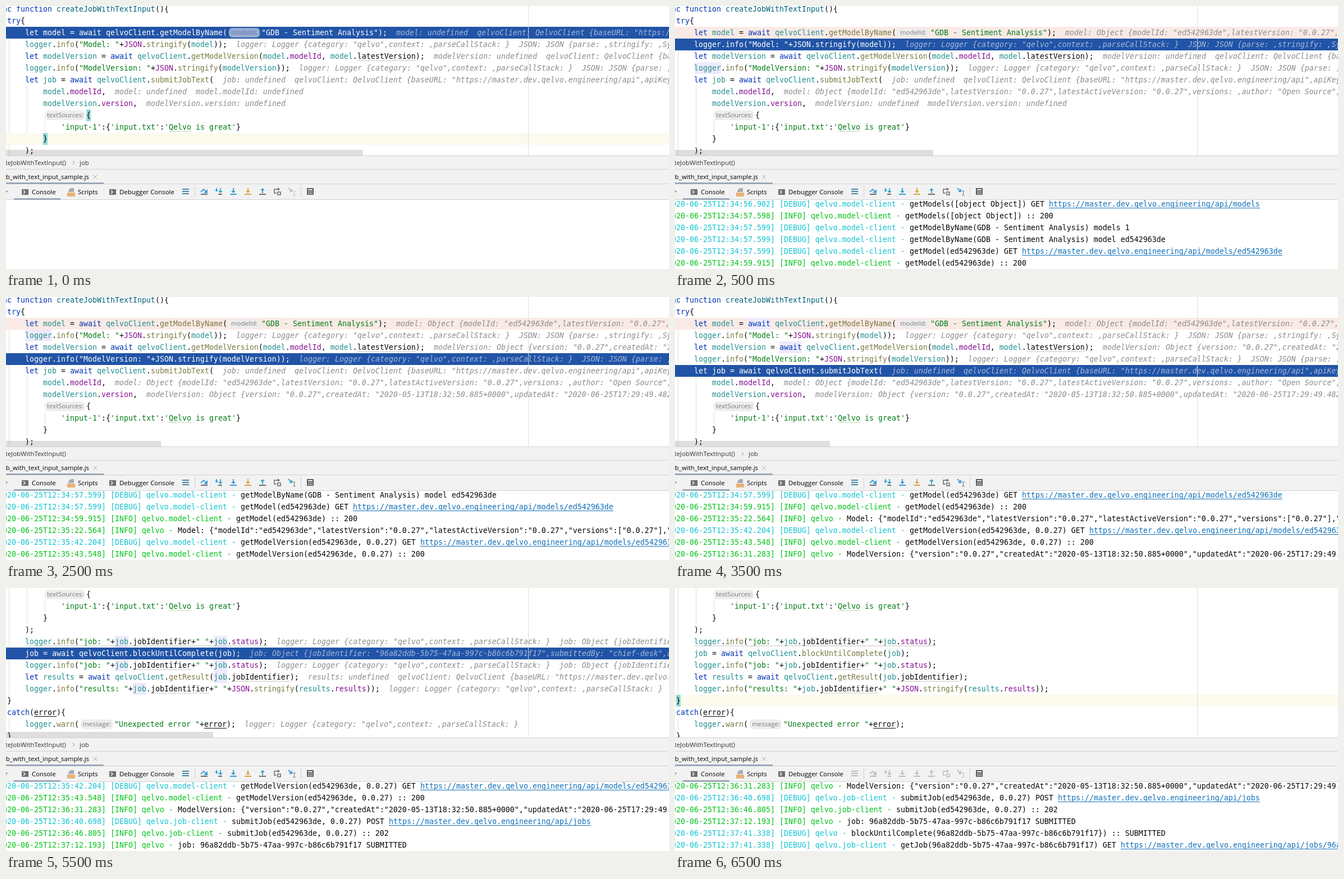
An HTML page that plays this animation: 1181x468 px, repeating every 8 s.

```html
<!DOCTYPE html>
<html lang="en">
<head>
<meta charset="utf-8">
<title>Debugger session</title>
<style>
html, body { margin: 0; width: 100%; height: 100%; overflow: hidden; background: #fff; }
svg { display: block; }
text { white-space: pre; }
.mono { font: 13.29px "DejaVu Sans Mono", "Noto Sans Mono", monospace; }
.hint { font-style: italic; }
.ui { font: 11.4px "Open Sans", "Noto Sans", sans-serif; }
</style>
</head>
<body>
<svg id="stage" width="1181" height="468" viewBox="0 0 1181 468"></svg>
<script>
const stage = document.getElementById('stage');
const CHAR = 8, ROW = 21;
const API = 'https://master.dev.qelvo.engineering/api';
const JOB = '96a82ddb-5b75-47aa-997c-b86c6b791f17';
const PILLS = { modelId: 61, textSources: 77, message: 63 };

// Column and text of each code line; parameter hints stand between § signs.
const CODE = [
  [-4, 'async function createJobWithTextInput(){'],
  [0, 'try{'],
  [4, 'let model = await qelvoClient.getModelByName(§modelId§"GDB - Sentiment Analysis");'],
  [4, 'logger.info("Model: "+JSON.stringify(model));'],
  [4, 'let modelVersion = await qelvoClient.getModelVersion(model.modelId, model.latestVersion);'],
  [4, 'logger.info("ModelVersion: "+JSON.stringify(modelVersion));'],
  [4, 'let job = await qelvoClient.submitJobText('],
  [8, 'model.modelId,'],
  [8, 'modelVersion.version,'],
  [8, '§textSources§{'],
  [12, "'input-1':{'input.txt':'Qelvo is great'}"],
  [8, '}'],
  [4, ');'],
  [4, 'logger.info("job: "+job.jobIdentifier+" "+job.status);'],
  [4, 'job = await qelvoClient.blockUntilComplete(job);'],
  [4, 'logger.info("job: "+job.jobIdentifier+" "+job.status);'],
  [4, 'let results = await qelvoClient.getResult(job.jobIdentifier);'],
  [4, 'logger.info("results: "+job.jobIdentifier+" "+JSON.stringify(results.results));'],
  [0, '}'],
  [0, 'catch(error){'],
  [4, 'logger.warn(§message§"Unexpected error "+error);'],
  [0, '}']
];

const BY_ID = 'model-client - getModelVersion(ed542963de, 0.0.27)';
const LOG = [
  `12:34:56.902|DEBUG|.model-client - getModels([object Object]) GET ${API}/models`,
  '12:34:57.598|INFO|.model-client - getModels([object Object]) :: 200',
  '12:34:57.599|DEBUG|.model-client - getModelByName(GDB - Sentiment Analysis) models 1',
  '12:34:57.599|DEBUG|.model-client - getModelByName(GDB - Sentiment Analysis) model ed542963de',
  `12:34:57.599|DEBUG|.model-client - getModel(ed542963de) GET ${API}/models/ed542963de`,
  '12:34:59.915|INFO|.model-client - getModel(ed542963de) :: 200',
  '12:35:22.564|INFO| - Model: {"modelId":"ed542963de","latestVersion":"0.0.27","latestActiveVersion":"0.0.27","versions":["0.0.27"],"author":',
  `12:35:42.204|DEBUG|.${BY_ID} GET ${API}/models/ed542963de/versions/0.0.27`,
  `12:35:43.548|INFO|.${BY_ID} :: 200`,
  '12:36:31.283|INFO| - ModelVersion: {"version":"0.0.27","createdAt":"2020-05-13T18:32:50.885+0000","updatedAt":"2020-06-25T17:29:49.482+0000"',
  `12:36:40.698|DEBUG|.job-client - submitJob(ed542963de, 0.0.27) POST ${API}/jobs`,
  '12:36:46.805|INFO|.job-client - submitJob(ed542963de, 0.0.27) :: 202',
  `12:37:12.193|INFO| - job: ${JOB} SUBMITTED`,
  `12:37:41.338|DEBUG| - blockUntilComplete(${JOB}}) :: SUBMITTED`,
  `12:37:41.338|DEBUG|.job-client - getJob(${JOB}) GET ${API}/jobs/${JOB}`
];

// exec: running line, mark: highlighted word, bar: scrollbar width, log: last console line
const SCENES = [
  { exec: 2, bar: 636, crumb: 'job', log: -1, caret: 11, braces: [[9, 143], [11, 66]] },
  { exec: 3, bar: 460, mark: 'logger', log: 5 },
  { exec: 4, bar: 460, mark: 'await', crumb: 'modelVersion', log: 6 },
  { exec: 5, bar: 276, mark: 'logger', log: 8 },
  { exec: 6, bar: 276, mark: 'await', crumb: 'job', log: 9 },
  { exec: 13, bar: 369, mark: 'logger', log: 11, scroll: 183 },
  { exec: 14, bar: 369, mark: 'job', crumb: 'job', log: 12, scroll: 183 },
  { bar: 0, log: 14, scroll: 183, caret: 18, braces: [[18, 2]] }
];

const rect = (x, y, w, h, fill, r = 0) =>
  `<rect x="${x}" y="${y}" width="${w}" height="${h}" rx="${r}" fill="${fill}"/>`;
const text = (x, y, body, fill, cls = 'mono', anchor = 'start') =>
  `<text x="${x}" y="${y}" fill="${fill}" class="${cls}" text-anchor="${anchor}">${body}</text>`;
const stroke = (d, color, width = 1) =>
  `<path d="${d}" fill="none" stroke="${color}" stroke-width="${width}"/>`;
const wave = (x, y, w, color) =>
  stroke(`M${x} ${y}` + 'l2 -2l2 2'.repeat(w / 4), color, 0.8);

function colorOf(word, before, after) {
  if (/^["']/.test(word)) return '#067d17';
  if (!/\w/.test(word)) return '#080808';
  if (/^(async|function|try|catch|let|await)$/.test(word)) return '#0033b3';
  if (/^(error|latestVersion|jobIdentifier)$/.test(word)) return '#080808';
  if (word === 'createJobWithTextInput') return '#00627a';
  if (before === '.') return after === '(' ? '#7a7a43' : '#871094';
  return word === 'JSON' ? '#871094' : '#248f8f';
}

function hints(n) {
  const model = n > 0
    ? 'model: Object {modelId: "ed542963de",latestVersion: "0.0.27",latestActiveVersion: "0.0.27",versions: ,author: "Open Source",'
    : 'model: undefined';
  const version = n > 2
    ? 'modelVersion: Object {version: "0.0.27",createdAt: "2020-05-13T18:32:50.885+0000",updatedAt: "2020-06-25T17:29:49.482+0000"'
    : 'modelVersion: undefined';
  const client = `  qelvoClient: QelvoClient {baseURL: "${API}",apiKey: "`;
  const logger = 'logger: Logger {category: "qelvo",context: ,parseCallStack: }';
  const json = logger + '  JSON: JSON {parse: ,stringify: ,Symbol(';
  const job = `job: Object {jobIdentifier: "${JOB}",submittedBy: "chief-desk",accountIdentifier`;
  const logJob = `${logger}  ${job}`;
  return {
    2: model + (n ? '' : client), 3: json, 4: version + (n > 2 ? '' : client), 5: json,
    6: 'job: undefined' + client,
    7: model + (n ? '' : '  model.modelId: undefined'),
    8: n ? version + (n > 2 ? '' : '  modelVersion.version: undefined') : 'modelVersion.version: undefined',
    13: logJob, 14: job, 15: logJob, 16: 'results: undefined' + client, 17: logger, 20: logger
  };
}

function codeLine(i, top, scene, hint) {
  const [col, source] = CODE[i];
  const exec = i === scene.exec, waveColor = exec ? '#a9bbdf' : '#b4b4b4';
  let x = 2 + col * CHAR, under = '', over = '';
  source.split('§').forEach((part, k) => {
    if (k % 2) {
      const w = PILLS[part];
      under += rect(x + 3, top + 2, w - 6, 17, exec ? '#96abd3' : '#ededed', 6);
      over += text(x + 7, top + 14, part + ':', exec ? '#65789f' : '#7a7a7a', 'ui');
      x += w;
      return;
    }
    let spans = '';
    for (const m of part.matchAll(/"[^"]*"|'[^']*'|\w+|[^\w"']/g)) {
      const word = m[0], at = x + m.index * CHAR, w = word.length * CHAR;
      const fill = exec ? '#fff' : colorOf(word, part[m.index - 1], part[m.index + word.length]);
      spans += `<tspan fill="${fill}">${word}</tspan>`;
      if (word === scene.mark && !exec) under += rect(at, top, w, ROW, '#edebfc');
      if (/^(latestVersion|jobIdentifier)$/.test(word)) over += wave(at, top + 19, w, waveColor);
      if (word.includes('Qelvo')) over += wave(at + CHAR, top + 19, 40, '#a9c4a4');
      if (word === 'error') over += rect(at, top + 17, w, 1, '#080808');
    }
    over += text(x, top + 15, spans, '#080808');
    x += part.length * CHAR;
  });
  if (i === 13) over += wave(34, top + 19, source.length * CHAR, waveColor);
  if (hint) over += text(x + 16, top + 15, hint, exec ? '#a5b8de' : '#8c8c8c', 'mono hint');
  return under + over;
}

function editor(n) {
  const scene = SCENES[n], topOf = i => i * ROW - 5 - (scene.scroll || 0);
  const band = (i, fill) => i === undefined ? '' : rect(0, topOf(i), 1181, ROW, fill);
  const guide = (x, from, to) => rect(x, topOf(from), 1, (to - from + 1) * ROW, '#e0e0e0');
  let out = rect(0, 0, 1181, 266, '#fff');
  out += guide(5, 2, 17) + guide(5, 20, 20) + guide(37, 7, 11) + guide(69, 10, 10);
  if (n) out += band(2, '#faeae6');
  out += band(scene.caret, '#fcfaed') + band(scene.exec, '#2154a6');
  out += rect(930, 0, 1, 266, '#dcdcdc');
  for (const [i, x] of scene.braces || []) out += rect(x, topOf(i), CHAR, ROW, '#93d9d9');
  const notes = n < 7 ? hints(n) : {};
  CODE.forEach((_, i) => {
    const top = topOf(i);
    if (top > -ROW + 2 && top < 266) out += codeLine(i, top, scene, notes[i]);
  });
  return out + rect(0, 256, scene.bar, 10, 'rgba(0,0,0,.13)');
}

function toolbar(n) {
  const off = n === 7, tint = c => off ? '#bdbdbd' : c;
  const blue = tint('#389fd6'), gray = tint('#6e6e6e'), gold = tint('#d9a343');
  const at = (x, body) => `<g transform="translate(${x} 330)">${body}</g>`;
  const down = (x, c) => stroke(`M${x} -6V0`, c, 2) +
    `<path d="M${x - 4} -1h8l-4 4z" fill="${c}"/>`;
  const into = c => down(0, c) + rect(-6, 4, 12, 2, c);
  const terminal = x => at(x, rect(-6, -4, 12, 10, '#6e6e6e') + stroke('M-3 -2l3 3l-3 3', '#f2f2f2', 1.5));
  const cursor = n === 0 || off ? '#bdbdbd' : '#389fd6';
  const beam = n === 0 || off ? '#bdbdbd' : '#6e6e6e';
  return terminal(34) + terminal(190) +
    at(116, '<path d="M0 -6h5v7h-10v-2z" fill="#a5adb4"/><path d="M-5 -2l4 -4v4z" fill="#a5adb4"/>' +
      rect(-7, 2, 14, 7, '#e8b277')) +
    at(320, [-5, -1, 3].map(y => rect(-6, y, 12, 2, tint('#4a86a8'))).join('')) +
    rect(336, 320, 1, 20, '#d1d1d1') + rect(525, 320, 1, 20, '#d1d1d1') +
    at(353, stroke('M-6 1L-1 -4L3 0', blue, 1.8) + `<path d="M6 -4v7h-7z" fill="${blue}"/>` + rect(-6, 4, 12, 2, gray)) +
    at(379, stroke('M-4 -6v4M3 -6V0', blue, 1.8) +
      `<path d="M-7 -3h6l-3 4zM-1 -1h8l-4 4z" fill="${blue}"/>` + rect(-1, 4, 7, 2, gray)) +
    at(405, into(blue)) + at(431, into(gold)) +
    at(457, stroke('M0 3V-2', blue, 2) + `<path d="M-4 -2h8l-4 -4z" fill="${blue}"/>` + rect(-6, 4, 12, 2, gray)) +
    at(483, stroke('M-1 3h-4v-7h7', gray, 1.6) + `<path d="M1 -7l4 3l-4 3z" fill="${gray}"/>` +
      stroke('M1 1h5v5h-5z', gray, 1.6)) +
    at(509, stroke('M-6 -6l5 5', cursor, 1.8) + `<path d="M1 -5v6h-6z" fill="${cursor}"/>` +
      stroke('M2 -1h1.5l1 1l1 -1h1.5M4.5 0v6M2 7h1.5l1 -1l1 1h1.5', beam)) +
    at(542, rect(-6, -6, 12, 12, '#5a5a5a') + rect(-4, -4, 8, 2, '#f2f2f2') +
      [-4, -1, 2].map(x => rect(x, 0, 2, 1.5, '#f2f2f2') + rect(x, 3, 2, 1.5, '#f2f2f2')).join(''));
}

function panels(n) {
  const { crumb } = SCENES[n];
  let out = rect(0, 266, 1181, 80, '#f2f2f2');
  for (const y of [266, 290, 316, 344]) out += rect(0, y, 1181, 1, '#d1d1d1');
  out += text(107, 283, 'createJobWithTextInput()', '#333', 'ui', 'end');
  if (crumb) out += stroke('M119 276l3 3l-3 3', '#8c8c8c') + text(131, 283, crumb, '#333', 'ui');
  out += text(148, 308, 'create_job_with_text_input_sample.js', '#000', 'ui', 'end') +
    stroke('M155.500 300.500l7 7m0 -7l-7 7', '#b0b0b0') +
    rect(0, 314, 174, 3, '#9ca7b8') + rect(14, 342, 83, 3, '#9ca7b8');
  out += text(3, 335, 'Debugger', '#000', 'ui', 'end');
  for (const [x, label] of [[46, 'Console'], [128, 'Scripts'], [202, 'Debugger Console']])
    out += text(x, 335, label, '#000', 'ui');
  return out + toolbar(n);
}

function consoleView(last) {
  let out = rect(0, 345, 1181, 123, '#fff');
  LOG.slice(Math.max(0, last - 5), last + 1).forEach((entry, k) => {
    const [time, level, rest] = entry.split('|');
    const cut = rest.indexOf(' - ') + 3, y = 357 + k * ROW;
    const head = `[2020-06-25T${time}] [${level}] qelvo${rest.slice(0, cut)}`;
    const [body, path] = rest.slice(cut).split(API);
    let x = -22;
    out += text(x, y, head, level === 'INFO' ? '#00c41a' : '#14c4d2');
    x += head.length * CHAR;
    out += text(x, y, body, '#080808');
    if (path !== undefined) {
      const link = API + path;
      x += body.length * CHAR;
      out += text(x, y, link, '#0f6fb8') + rect(x, y + 2, link.length * CHAR, 1, '#0f6fb8');
    }
  });
  return out;
}

let shown = -1;
function draw() {
  const t = performance.now() % 8000;
  const n = Math.min(7, Math.floor((t + 500) / 1000));
  if (n !== shown) {
    shown = n;
    stage.innerHTML = editor(n) + panels(n) + consoleView(SCENES[n].log);
  }
  requestAnimationFrame(draw);
}
draw();
</script>
</body>
</html>
```
